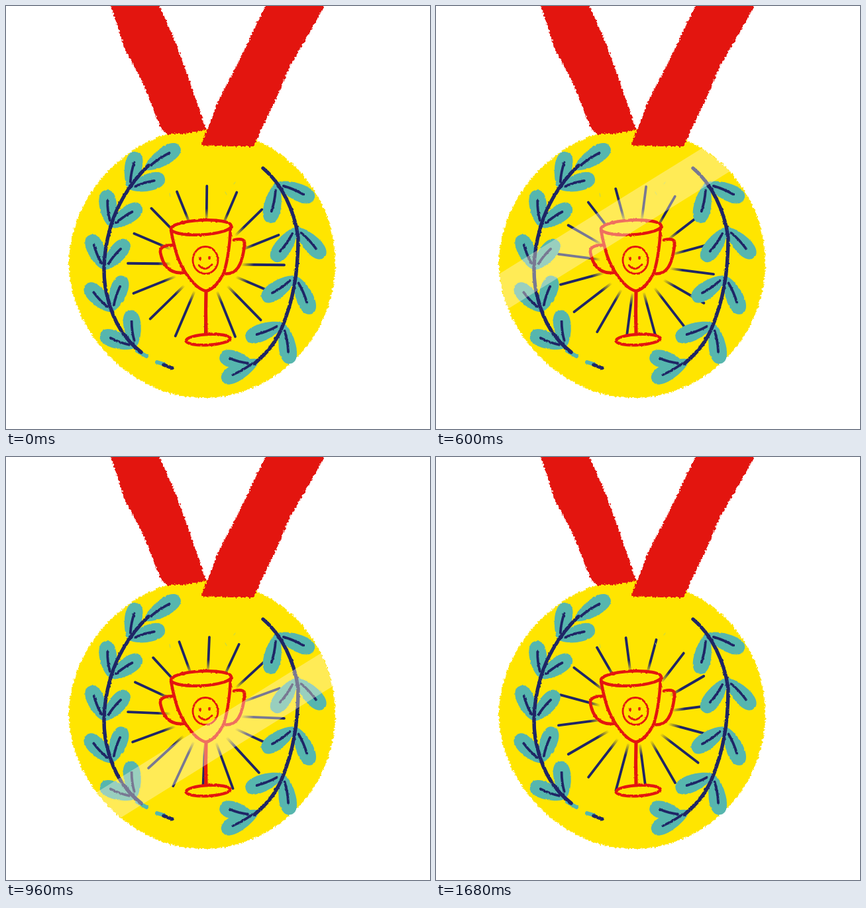
Recreate the animation shown at these times as an HTML page. Size 640 by 639 pixels, loop 1.71 s.

```html
<!DOCTYPE html>
<html lang="en">
<head>
<meta charset="utf-8">
<title>Medal</title>
<style>
html, body { margin: 0; width: 100%; height: 100%; overflow: hidden; background: #fff; }
svg { display: block; width: 100%; height: 100%; }
</style>
</head>
<body>
<svg viewBox="0 0 640 639" preserveAspectRatio="none" fill="none" stroke-linecap="round" stroke-linejoin="round">
  <defs>
    <filter id="ragged" filterUnits="userSpaceOnUse" x="-20" y="-20" width="680" height="680" color-interpolation-filters="sRGB">
      <feTurbulence type="fractalNoise" baseFrequency=".3" numOctaves="2" seed="4"/>
      <feColorMatrix values="1 0 0 0 0 0 1 0 0 0 0 0 1 0 0 0 0 0 0 1" result="noise"/>
      <feDisplacementMap in="SourceGraphic" in2="noise" scale="6" xChannelSelector="R" yChannelSelector="G"/>
    </filter>
    <filter id="crayon" filterUnits="userSpaceOnUse" x="0" y="0" width="640" height="639" color-interpolation-filters="sRGB">
      <feTurbulence type="fractalNoise" baseFrequency=".25" numOctaves="2" seed="9"/>
      <feColorMatrix values="1 0 0 0 0 0 1 0 0 0 0 0 1 0 0 0 0 0 0 1" result="noise"/>
      <feDisplacementMap in="SourceGraphic" in2="noise" scale="2.5" xChannelSelector="R" yChannelSelector="G"/>
    </filter>
    <radialGradient id="fade">
      <stop offset=".74" stop-color="#ffe500"/>
      <stop offset="1" stop-color="#ffe500" stop-opacity="0"/>
    </radialGradient>
    <path id="disc" d="M296 185C407 185 497 276 497 388S407 592 296 592C192 592 95 493 95 388S192 185 296 185Z"/>
    <clipPath id="inDisc"><use href="#disc"/></clipPath>
  </defs>

  <use href="#disc" fill="#ffe500" filter="url(#ragged)"/>

  <g id="rays" stroke="#1f2566" stroke-width="3.8"></g>
  <circle cx="302" cy="379" r="73" fill="url(#fade)"/>
  <path d="M331 281l2 4M344 269l2-3M247 283l1 5" stroke="#b9d65a"/>

  <g filter="url(#crayon)">
    <g id="leaves" fill="#56b6ae" stroke="#56b6ae" stroke-width="2"></g>
    <path d="M198 521L212 529M228 538L238 541" stroke="#56b6ae" stroke-width="6"/>
    <g stroke="#1f2566" stroke-width="5.4">
      <g id="veins" stroke-width="3.8"></g>
      <path id="leftStem" d="M204 523C182 506 163 479 154 443C146 415 145 378 158 333C166 306 184 270 215 241"/>
      <path id="rightStem" d="M388 245C416 268 436 310 441 350C441 405 433 446 416 487C406 510 393 525 375 540"/>
      <path d="M238 542L251 547"/>
    </g>
  </g>

  <g filter="url(#crayon)" stroke="#e3150f" stroke-width="4.6">
    <g transform="translate(1 .5)">
      <path d="M255 361C240 360 231 363 232 372C237 397 251 405 270 402M343 353C355 350 360 352 359 361C355 394 346 404 331 404"/>
      <path d="M248 338C254 371 260 388 271 404C280 417 290 428 301 430C312 428 322 415 328 402C334 382 337 358 338 334" fill="#ffe500"/>
      <ellipse cx="293.5" cy="334" rx="45.5" ry="11" transform="rotate(-3 293.5 334)" fill="#ffe500"/>
      <path d="M301 430Q300 462 301 494" stroke-width="5.2"/>
      <ellipse cx="304" cy="503.500" rx="33.500" ry="8" transform="rotate(-3 304 503.500)" fill="#ffe500"/>
      <ellipse cx="300" cy="383.500" rx="19" ry="20.500" stroke-width="2.800"/>
      <path d="M290 391Q299 402 310 390" stroke-width="2.800"/>
      <path d="M292 380V382M306 379V381" stroke-width="3.600"/>
    </g>
  </g>

  <path id="shine" d="M0 126L640 -271V-210L0 187Z" fill="#fff4d8" fill-opacity=".4"/>

  <g fill="#e3150f" stroke="#e3150f" stroke-width="2" filter="url(#ragged)">
    <path d="M159 -9V0L182 68L204 108L233 180L241 192H270L301 186L285 140L257 60L231 0V-9Z"/>
    <path d="M392 -9V0L362 65L320 147L296 209L340 211H373L411 130L428 90L480 0V-9Z"/>
  </g>
</svg>
<script>
const LOOP = 1710, STEP = 30;
const SPIN = 11.7 / 240;    // degrees per ms
const SWEEP = 0.354;        // pixels per ms
const RAYS = 16;
const byId = id => document.getElementById(id);

function addPath(parent, d, transform) {
  const el = document.createElementNS("http://www.w3.org/2000/svg", "path");
  el.setAttribute("d", d);
  el.setAttribute("transform", transform);
  byId(parent).append(el);
}

// Teardrop with a vein, growing from (x, y) towards angle.
function leaf(x, y, angle, length, bulge = 19) {
  const place = `translate(${x} ${y}) rotate(${angle})`;
  const c1 = length * .2, c2 = length * 1.02, side = bulge * .7;
  addPath("leaves", `M0 0C${c1} ${side} ${c2} ${bulge} ${length} 0C${c2} ${-bulge} ${c1} ${-side} 0 0Z`, place);
  addPath("veins", `M${length * .18} 0Q${length * .45} -2 ${length * .72} 0`, place);
}

// Leaf pairs at even gaps along a stem, then one leaf at its end.
function growBranch(id, { first, gap, pairs, spread, length }) {
  const stem = byId(id), lean = 8;
  const leafAt = (distance, turn, size) => {
    const a = stem.getPointAtLength(distance - 4), b = stem.getPointAtLength(distance + 4);
    const heading = Math.atan2(b.y - a.y, b.x - a.x) * 180 / Math.PI;
    leaf((a.x + b.x) / 2, (a.y + b.y) / 2, heading + turn, size);
  };
  for (let i = 0; i < pairs; i++) {
    for (const side of [-1, 1]) leafAt(first + gap * i, lean + side * spread, length);
  }
  leafAt(stem.getTotalLength() - 8, 12, 62);
}

growBranch("leftStem", { first: 12, gap: 65, pairs: 5, spread: 31, length: 55 });
growBranch("rightStem", { first: 31, gap: 74, pairs: 4, spread: 39, length: 60 });
leaf(374, 542, 195, 52);

for (let i = 0; i < RAYS; i++) {
  addPath("rays", "M0 -46V-118", `rotate(${i * 360 / RAYS + .6})`);
}

byId("shine").parentNode.insertBefore(document.createElementNS("http://www.w3.org/2000/svg", "g"), byId("shine"))
  .append(byId("shine"));
byId("shine").parentNode.setAttribute("clip-path", "url(#inDisc)");

function draw(now) {
  const t = Math.floor(now % LOOP / STEP) * STEP;
  byId("rays").setAttribute("transform", `translate(302 390) rotate(${t * SPIN})`);
  byId("shine").setAttribute("transform", `translate(0 ${125.5 + t * SWEEP})`);
}

const start = performance.now();
function tick() {
  draw(performance.now() - start);
  requestAnimationFrame(tick);
}
tick();
</script>
</body>
</html>
```
